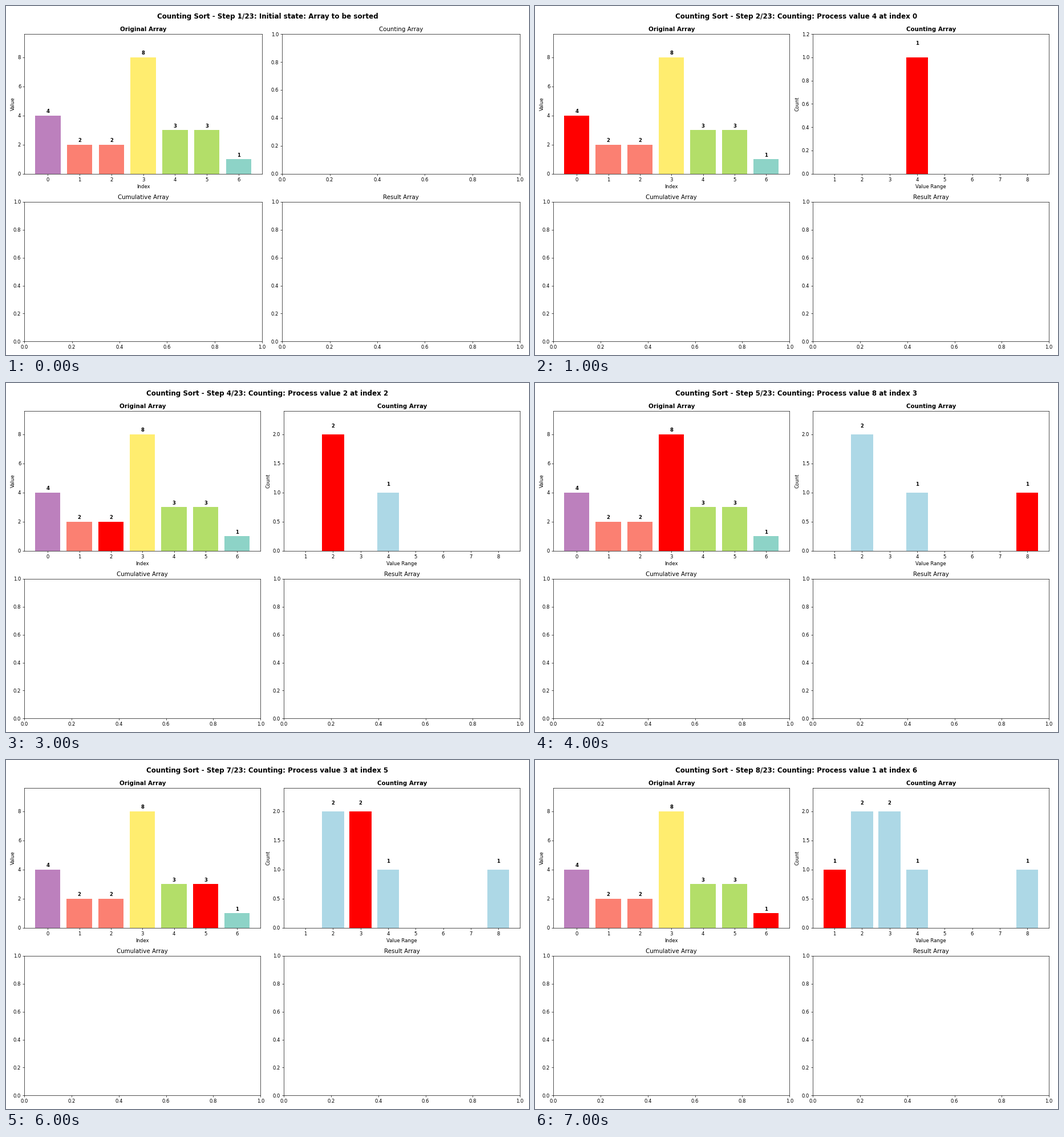
Write a matplotlib script that moves like this. It is 917x611 px and loops after 8000 ms.

```python
import matplotlib.pyplot as plt
import numpy as np
from matplotlib.animation import FuncAnimation

W, H = 917, 611
DPI = W / 15
STEPS_TOTAL = 23
VALUES = [4, 2, 2, 8, 3, 3, 1]
RANGE = range(min(VALUES), max(VALUES) + 1)

plt.rcParams["font.family"] = "DejaVu Sans"

# The tiny surplus keeps float rounding from losing a pixel.
fig, axes = plt.subplots(2, 2, figsize=((W + 0.01) / DPI, (H + 0.01) / DPI), dpi=DPI)
ax_orig, ax_count, ax_cumul, ax_result = axes.flat

unique = sorted(set(VALUES))
palette = dict(zip(unique, plt.cm.Set3(np.linspace(0, 1, len(unique)))))


def layout(gap):
    """Place the four panels; gap is the space between columns in pixels."""
    left, right, top, bottom = 32.2, 901.2, 49.2, 587.3
    row_gap = 49.3
    fig.subplots_adjust(
        left=left / W, right=right / W, top=1 - top / H, bottom=1 - bottom / H,
        wspace=gap / ((right - left - gap) / 2),
        hspace=row_gap / ((bottom - top - row_gap) / 2))


def bar_panel(ax, xs, heights, colors, title, xlabel, ylabel):
    ax.bar(xs, heights, color=colors)
    for x, h in zip(xs, heights):
        if h > 0:
            ax.text(x, h + 0.1, str(h), ha="center", va="bottom", fontweight="bold")
    ax.set_title(title, fontweight="bold")
    ax.set_xlabel(xlabel)
    ax.set_ylabel(ylabel)
    ax.set_xticks(xs)
    ax.set_ylim(0, max(heights) * 1.2)


def draw(step):
    for ax in axes.flat:
        ax.clear()
    active = step - 1
    colors = ["red" if i == active else palette[v] for i, v in enumerate(VALUES)]
    bar_panel(ax_orig, list(range(len(VALUES))), VALUES, colors,
              "Original Array", "Index", "Value")

    if step == 0:
        note = "Initial state: Array to be sorted"
        ax_count.set_title("Counting Array")
        layout(35.1)
    else:
        value = VALUES[active]
        note = f"Counting: Process value {value} at index {active}"
        counts = [VALUES[:step].count(v) for v in RANGE]
        colors = ["red" if v == value else "lightblue" for v in RANGE]
        bar_panel(ax_count, list(RANGE), counts, colors,
                  "Counting Array", "Value Range", "Count")
        layout(40.8)

    ax_cumul.set_title("Cumulative Array")
    ax_result.set_title("Result Array")
    fig.suptitle(f"Counting Sort - Step {step + 1}/{STEPS_TOTAL}: {note}",
                 fontsize=14, fontweight="bold")
    return []


anim = FuncAnimation(fig, draw, frames=len(VALUES) + 1, interval=1000,
                     init_func=lambda: [], repeat=True, repeat_delay=0)
plt.show()
```
